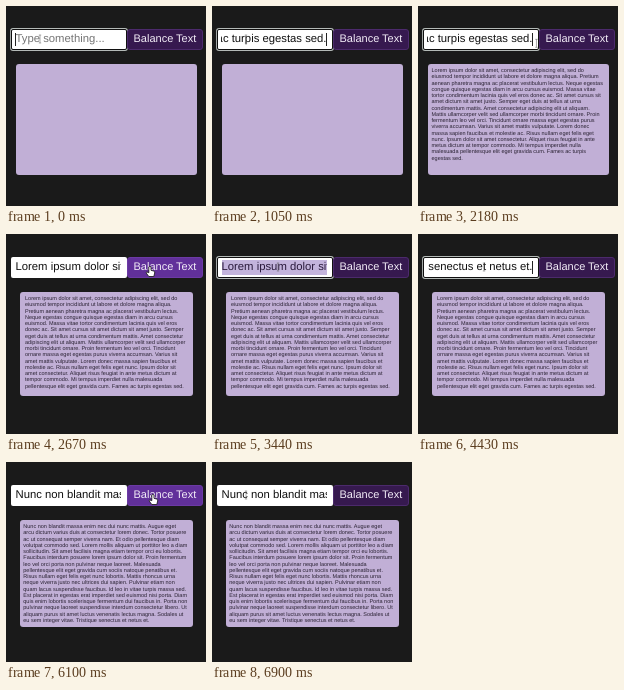
These frames come from a looping animation (200x200 px, 6.98 s). An HTML page:

```html
<!DOCTYPE html>
<html lang="en">
<head>
<meta charset="utf-8">
<title>Balance Text</title>
<style>
  html, body { margin: 0; width: 100%; height: 100%; overflow: hidden; background: #1a1a1a; }
  body { font: 11px/21px "Liberation Sans", Arial, sans-serif; text-rendering: geometricPrecision; }
  div, span, svg { position: absolute; box-sizing: border-box; white-space: pre; }
  #field { left: 4.5px; top: 23px; width: 116px; height: 21px; background: #fff; border-radius: 2px; }
  #field.focus { border: 1px solid #101010; box-shadow: 0 0 0 .9px #b4bab7; }
  #clip { left: 9px; top: 23px; width: 106px; height: 21px; overflow: hidden; font-size: 11.3px; color: #111; }
  #value { left: .5px; }
  #value.tail { left: auto; right: .5px; }
  #value.hint { color: #757575; }
  #value.selected { background: #c3b4dc; color: #2a1a3c; top: 3px; line-height: 15px; }
  #caret { top: 27px; width: 1px; height: 13px; background: #222; }
  #button { left: 121px; top: 23px; width: 76px; height: 21px; padding-left: 5.5px;
    border: 1px solid #4c2a6c; border-radius: 3px; line-height: 18.5px; background: #36194f; color: #f2ecf7; }
  #button.hover { background: #61309a; border-color: #6c3aa5; }
  #box { top: 58px; padding-top: 4px; border-radius: 3px; background: #c1afd6;
    font-size: 5.53px; line-height: 6.27px; color: #2a2233; }
  svg { left: 0; top: 0; width: 200px; height: 200px; }
</style>
</head>
<body>
<div id="field"></div>
<div id="clip"><span id="value"></span></div>
<div id="caret"></div>
<div id="button">Balance Text</div>
<div id="box"></div>
<svg viewBox="0 0 200 200">
  <path id="beam" d="M-1.2-4H1.2M0-4V4M-1.2 4H1.2" fill="none" stroke="#555" stroke-width=".5"/>
  <path id="hand" d="M-1.2-4.5Q0-6 1-4.5V-1.2L4-.4Q5 0 4.7 1.5L3.8 5H-1.2L-4 1.2Q-3.6-.2-1.2 1.2Z"
    fill="#fff" stroke="#111" stroke-width=".8"/>
</svg>
<script>
const LOOP = 6980;

// Line breaks: "|" plain wrapping, "/" balanced wrapping, "+" both.
const first = 'Lorem ipsum dolor sit amet, consectetur adipiscing elit, sed do+eiusmod tempor incididunt ut labore et dolore magna aliqua./Pretium|aenean pharetra magna ac placerat vestibulum lectus./Neque egestas|congue quisque egestas diam in arcu cursus/euismod. Massa vitae|tortor condimentum lacinia quis vel eros/donec ac. Sit amet cursus sit|amet dictum sit amet justo. Semper/eget duis at tellus at urna|condimentum mattis. Amet consectetur/adipiscing elit ut aliquam.|Mattis ullamcorper velit sed ullamcorper/morbi tincidunt ornare. Proin|fermentum leo vel orci. Tincidunt/ornare massa eget egestas purus|viverra accumsan. Varius sit/amet mattis vulputate. Lorem donec|massa sapien faucibus et/molestie ac. Risus nullam eget felis eget|nunc. Ipsum dolor sit/amet consectetur. Aliquet risus feugiat in ante|metus dictum at/tempor commodo. Mi tempus imperdiet nulla|malesuada/pellentesque elit eget gravida cum. Fames ac turpis|egestas sed.';
const second = 'Nunc non blandit massa enim nec dui nunc mattis. Augue eget/arcu|dictum varius duis at consectetur lorem donec. Tortor posuere/ac ut|consequat semper viverra nam. Et odio pellentesque diam/volutpat|commodo sed. Lorem mollis aliquam ut porttitor leo a diam/sollicitudin.|Sit amet facilisis magna etiam tempor orci eu lobortis./Faucibus|interdum posuere lorem ipsum dolor sit. Proin fermentum/leo vel orci|porta non pulvinar neque laoreet. Malesuada/pellentesque elit eget|gravida cum sociis natoque penatibus et./Risus nullam eget felis eget|nunc lobortis. Mattis rhoncus urna/neque viverra justo nec ultrices dui|sapien. Pulvinar etiam non/quam lacus suspendisse faucibus. Id leo in|vitae turpis massa sed./Est placerat in egestas erat imperdiet sed|euismod nisi porta. Diam/quis enim lobortis scelerisque fermentum dui|faucibus in. Porta non/pulvinar neque laoreet suspendisse interdum|consectetur libero. Ut/aliquam purus sit amet luctus venenatis lectus|magna. Sodales ut/eu sem integer vitae. Tristique senectus et netus|et.';

const flat = text => text.replace(/[|/+]/g, ' ');
const wrap = (text, mark) => text.replace(/[|/+]/g, c => c === mark || c === '+' ? '\n' : ' ');

// Each entry: start time, then the state from that time on.
const fieldStates = [
  [0, 'Type something...', 'hint', true],
  [1050, flat(first), 'tail', true],
  [2670, flat(first), '', false],
  [3370, flat(first), '', true],
  [3440, flat(first), 'selected', true],
  [4430, flat(second), 'tail', true],
  [6020, flat(second), '', false]
];
// Start time, text, left, right, bottom, inset
const boxStates = [
  [0, '', 10, 191, 169, 4],
  [1220, wrap(first, '|'), 10, 191, 169, 3.5],
  [2670, wrap(first, '/'), 14, 187, 162, 5],
  [4580, wrap(second, '|'), 10, 191, 169, 4],
  [6020, wrap(second, '/'), 14, 187, 165, 3.3]
];
// Start time, visible, x
const caretStates = [
  [0, 1, 9], [510, 0, 9], [980, 1, 9], [1050, 1, 114.3], [1550, 0, 114.3], [2050, 1, 114.3],
  [2580, 0, 114.3], [4430, 1, 114.3], [4930, 0, 114.3], [5440, 1, 114.3], [5940, 0, 114.3]
];
// Start, end, from x, y, to x, y
const moves = [
  [0, 1, 34, 33, 34, 33],
  [1720, 2350, 68, 37, 144, 37.5],
  [2740, 3200, 144, 37.5, 66, 33],
  [4930, 5440, 66, 33, 147, 37.5],
  [6670, 6900, 147, 37.5, 34, 33]
];

const $ = id => document.getElementById(id);
const at = (states, t) => states.findLast(s => s[0] <= t);

function pointer(t) {
  const [start, end, x0, y0, x1, y1] = at(moves, t);
  const stepped = Math.floor((t - start) / 77) * 77;
  const p = t >= end ? 1 : Math.min(1, stepped / (end - start));
  const eased = p * p * (3 - 2 * p);
  return [x0 + (x1 - x0) * eased, y0 + (y1 - y0) * eased];
}

function draw(t) {
  const [, value, look, focus] = at(fieldStates, t);
  $('field').className = focus ? 'focus' : '';
  $('value').className = look;
  $('value').textContent = value;

  const [, text, left, right, bottom, inset] = at(boxStates, t);
  $('box').textContent = text;
  Object.assign($('box').style, {
    left: left + 'px', width: right - left + 'px', height: bottom - 58 + 'px', paddingLeft: inset + 'px'
  });

  const [, visible, caretX] = at(caretStates, t);
  $('caret').style.left = caretX + 'px';
  $('caret').style.opacity = visible;

  const [x, y] = pointer(t);
  const over = x > 121;
  $('button').className = over ? 'hover' : '';
  for (const id of ['beam', 'hand']) {
    $(id).setAttribute('transform', `translate(${x} ${y})`);
    $(id).style.display = (id === 'hand') === over ? '' : 'none';
  }
}

function tick() {
  draw(performance.now() % LOOP);
  requestAnimationFrame(tick);
}
tick();
</script>
</body>
</html>
```
